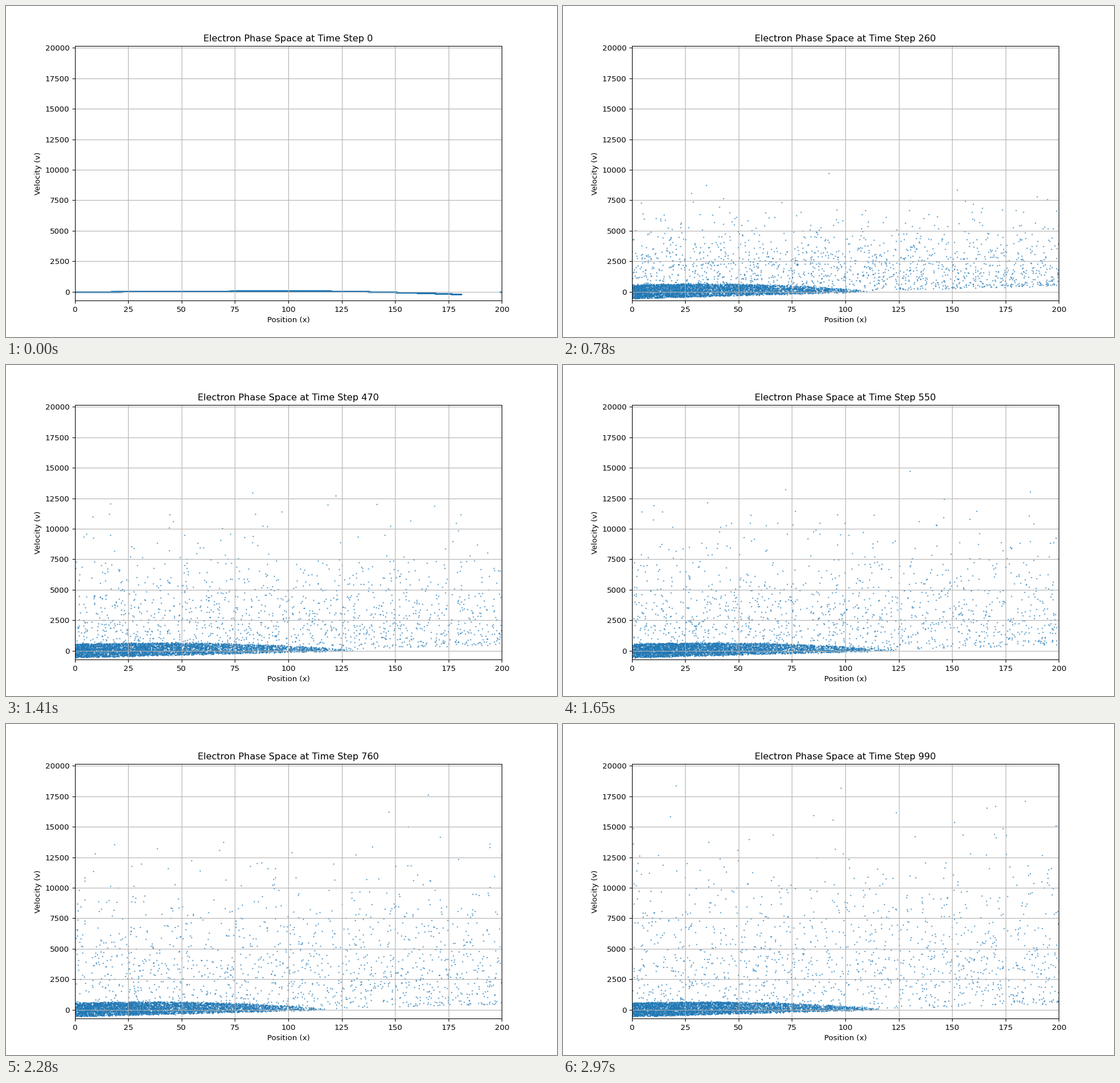
Recreate the animation shown at these times as a matplotlib script. Size 966 by 580 pixels, loop 3000 ms.

```python
import numpy as np
import matplotlib.pyplot as plt
from matplotlib.animation import FuncAnimation

FRAMES, INTERVAL, STEP = 100, 30, 10
N, HOT, BOX = 6000, 4000, 200

rng = np.random.default_rng(4)

# Hot electrons: velocity random walk, periodic drift in x
kicks = rng.normal(0, 550, (FRAMES, HOT))
kicks[0] = 0
hot_v = np.abs(np.cumsum(kicks, axis=0))
hot_x = (rng.uniform(0, BOX, HOT) + np.cumsum(hot_v * 0.05, axis=0)) % BOX

# Cold beam: one smooth arc, its left end wrapped round the box
cold_x = rng.uniform(-1, 181, N)
d = cold_x - 100
drop = np.where(d > 0, 280 * (d / 81) ** 2, 80 * (np.abs(d) / 100) ** 1.2)
cold_v = 66 - drop + rng.uniform(-3, 3, N)
cold_x %= BOX


def hot_part(k):
    n = int(1300 + 2500 * np.exp(-k / 10))
    x, v = hot_x[k, :n], hot_v[k, :n]
    floor = np.clip((x - 100) * 4.7, 0, None)
    return x, np.where(v < floor, 2 * floor - v, v)


def trapped_part(k, n):
    r = np.random.default_rng(100 + k)
    length = 120 + 70 * np.exp(-k / 5) + 10 * np.cos(2 * np.pi * (k - 47) / 40)
    t = r.beta(1, 2, n)
    top = 560 + 650 * t - 1110 * t**2
    low = -560 * (1 - t)
    v = low + (top - low) * r.random(n) + r.normal(0, 20, n)

    # Blend out of the cold beam during the first steps
    mix, heat = min(1, k / 6), min(1, k / 8) ** 0.5
    x = (1 - mix) * cold_x[:n] + mix * t * length
    return x, (1 - heat) * cold_v[:n] + heat * v


def phase_space(k):
    if k == 0:
        return np.column_stack([cold_x, cold_v])
    hot = np.column_stack(hot_part(k))
    trapped = np.column_stack(trapped_part(k, N - len(hot)))
    return np.vstack([trapped, hot])


fig, ax = plt.subplots(figsize=(10, 6.005), dpi=96.6)
dots = ax.scatter(cold_x, cold_v, s=0.5, alpha=0.7, color="C0")
ax.set(xlim=(0, BOX), ylim=(-730, 20175),
       xlabel="Position (x)", ylabel="Velocity (v)")
ax.grid(True)


def update(k):
    dots.set_offsets(phase_space(k))
    ax.set_title(f"Electron Phase Space at Time Step {k * STEP}")
    return (dots,)


anim = FuncAnimation(fig, update, frames=FRAMES, interval=INTERVAL,
                     init_func=lambda: update(0), repeat=True, repeat_delay=0)
plt.show()
```
